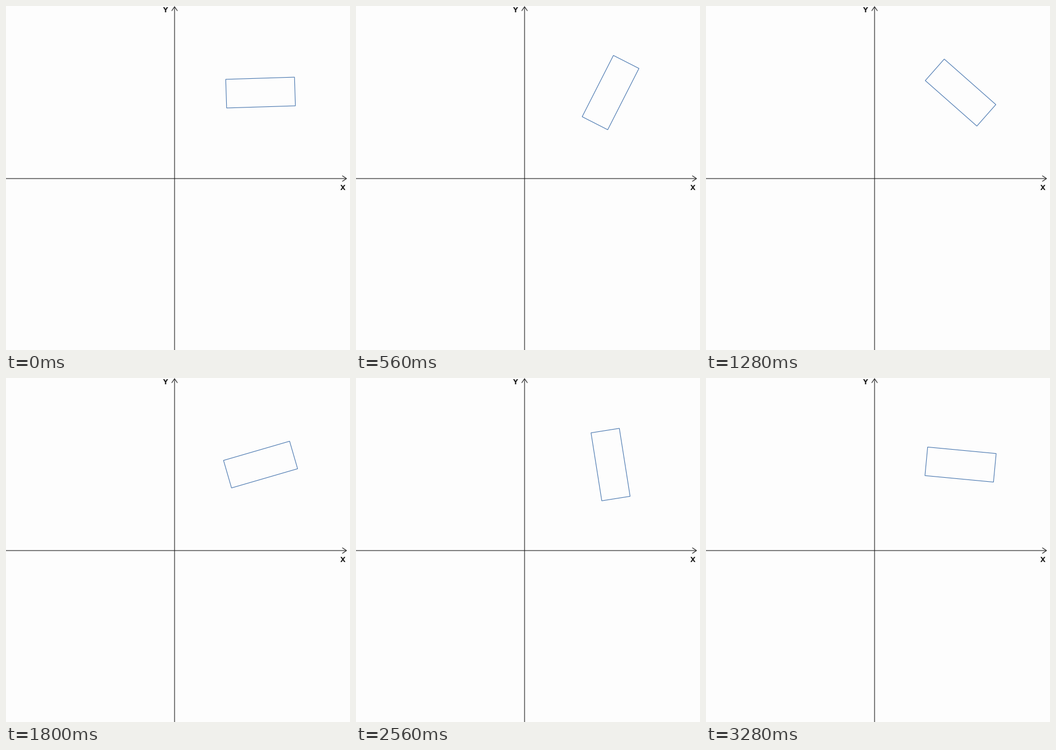
Write a matplotlib script that moves like this. It is 600 by 600 pixels and loops after 3.32 s.

```python
import numpy as np
import matplotlib.pyplot as plt
from matplotlib.animation import FuncAnimation
from matplotlib.patches import Polygon

SIZE, DPI = 600, 100
FRAMES, INTERVAL = 83, 40
STEPS = 100                      # rotation steps per turn
PX = 72 / DPI                    # one pixel in points

PAPER, INK, EDGE = "#fdfdfd", "#1c1c1c", "#4a78b0"
ORIGIN = np.array([294, 301])
CENTER = ORIGIN + [150, -150]
CORNERS = np.array([[-60, -25], [60, -25], [60, 25], [-60, 25]])

fig = plt.figure(figsize=(SIZE / DPI, SIZE / DPI), dpi=DPI, facecolor=PAPER)
ax = fig.add_axes([0, 0, 1, 1])
ax.set_xlim(0, SIZE)
ax.set_ylim(SIZE, 0)
ax.axis("off")


def line(points):
    x, y = zip(*points)
    ax.plot(x, y, color=INK, lw=1.1 * PX, snap=False,
            solid_capstyle="butt", solid_joinstyle="miter")


def label(x, y, text):
    ax.text(x, y, text, color=INK, family="DejaVu Sans", weight="bold",
            size=12 * PX, ha="center", va="baseline")


ox, oy = ORIGIN
line([(0, oy), (594, oy)])
line([(ox, 1), (ox, SIZE)])
line([(586.5, oy - 5), (594, oy), (586.5, oy + 5)])
line([(ox - 5, 8.5), (ox, 1.2), (ox + 5, 8.5)])
label(277.3, 11, "Y")
label(587.3, 321, "X")

box = Polygon(CORNERS + CENTER, closed=True, fill=False, ec=EDGE,
              lw=1.1 * PX, joinstyle="miter", snap=False)
ax.add_patch(box)


def update(i):
    # whole rotation steps, sampled slightly slower than they tick
    step = np.floor(i * STEPS / FRAMES + 0.16)
    a = -np.radians((step + 0.5) * 360 / STEPS)
    c, s = np.cos(a), np.sin(a)
    box.set_xy(CORNERS @ np.array([[c, s], [-s, c]]) + CENTER)
    return [box]


anim = FuncAnimation(fig, update, frames=FRAMES, interval=INTERVAL,
                     repeat=True, repeat_delay=0)
plt.show()
```
